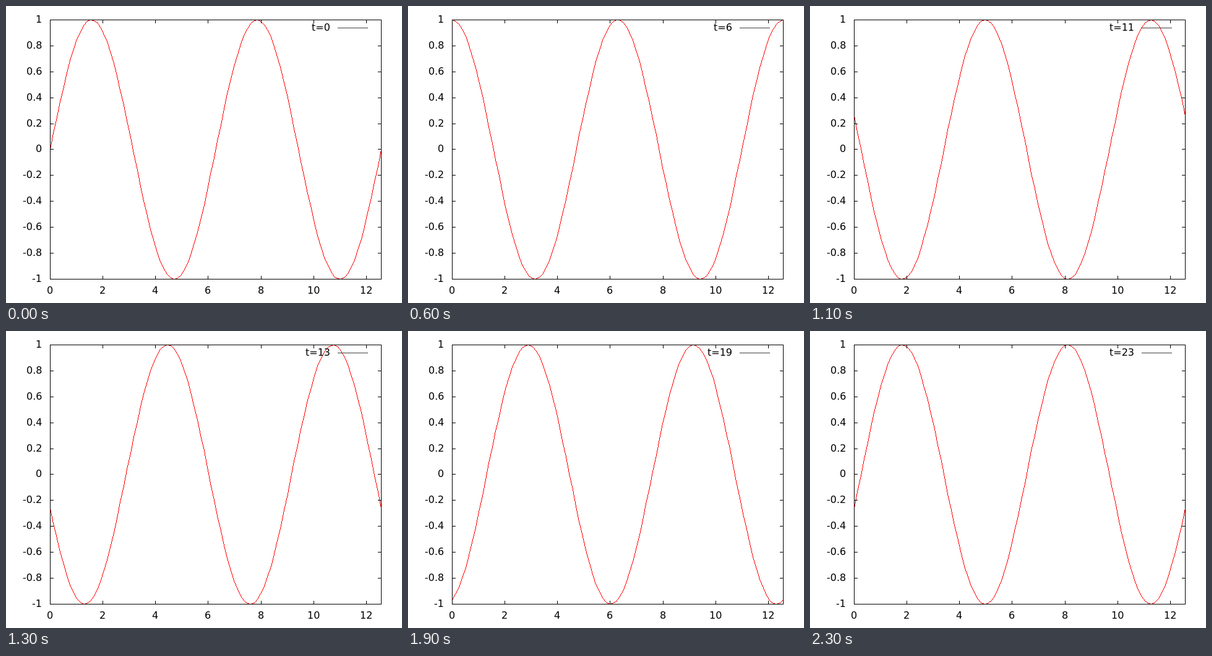
These frames come from a looping animation (640x480 px, 2.4 s). An HTML page with a canvas:

```html
<!DOCTYPE html>
<html lang="en">
<head>
<meta charset="utf-8">
<title>Travelling sine wave</title>
<style>
  html, body { margin: 0; width: 100%; height: 100%; overflow: hidden; background: #fff; }
  canvas { display: block; }
</style>
</head>
<body>
<canvas id="plot" width="640" height="480"></canvas>
<script>
const ctx = document.getElementById('plot').getContext('2d');
const LEFT = 71, RIGHT = 606, TOP = 22, BOTTOM = 441;
const X_MAX = 4 * Math.PI, SAMPLES = 100;
const STEPS = 24, STEP_MS = 100;

const mapX = x => Math.round(LEFT + x / X_MAX * (RIGHT - LEFT));
const mapY = y => BOTTOM - Math.round((y + 1) / 2 * (BOTTOM - TOP));

// Solid one-pixel line without antialiasing
function line(x0, y0, x1, y1, color) {
  ctx.fillStyle = color;
  const dx = Math.abs(x1 - x0), dy = Math.abs(y1 - y0);
  const sx = Math.sign(x1 - x0), sy = Math.sign(y1 - y0);
  const steep = dy > dx;
  const long = Math.max(dx, dy), short = Math.min(dx, dy);
  let d = 2 * short - long;
  for (let i = 0, x = x0, y = y0; i <= long; i++) {
    ctx.fillRect(x, y, 1, 1);
    if (d >= 0) {
      if (steep) x += sx; else y += sy;
      d -= 2 * long;
    }
    if (steep) y += sy; else x += sx;
    d += 2 * short;
  }
}

// align: 1 ends the text at x, 0.5 centres it there
function label(text, x, y, align) {
  ctx.font = '16px "DejaVu Sans", Verdana, sans-serif';
  ctx.fillStyle = '#000';
  ctx.fillText(text, Math.round(x - ctx.measureText(text).width * align), y + 5);
}

function drawCurve(phase) {
  let px, py;
  for (let i = 0; i < SAMPLES; i++) {
    const x = i / (SAMPLES - 1) * X_MAX;
    const qx = mapX(x), qy = mapY(Math.sin(x + phase));
    if (i) line(px, py, qx, qy, '#f00');
    px = qx;
    py = qy;
  }
}

function drawAxes() {
  for (let i = -5; i <= 5; i++) {
    const y = mapY(i / 5);
    line(LEFT, y, LEFT + 5, y, '#000');
    line(RIGHT - 5, y, RIGHT, y, '#000');
    label(String(i / 5), 58, y, 1);
  }
  for (let v = 0; v <= 12; v += 2) {
    const x = mapX(v);
    line(x, BOTTOM - 5, x, BOTTOM, '#000');
    line(x, TOP, x, TOP + 5, '#000');
    label(String(v), x + 0.5, 460, 0.5);
  }
  for (const y of [TOP, BOTTOM]) line(LEFT, y, RIGHT, y, '#000');
  for (const x of [LEFT, RIGHT]) line(x, TOP, x, BOTTOM, '#000');
}

function draw(t) {
  ctx.fillStyle = '#fff';
  ctx.fillRect(0, 0, 640, 480);
  drawCurve(2 * Math.PI * t / STEPS);
  label('t=' + t, 524, 35, 1);
  line(536, 35, 584, 35, '#404040');
  drawAxes();
}

const start = performance.now();
let shown = -1;
function tick() {
  const t = Math.floor((performance.now() - start) / STEP_MS) % STEPS;
  if (t !== shown) draw(shown = t);
  requestAnimationFrame(tick);
}
tick();
</script>
</body>
</html>
```
